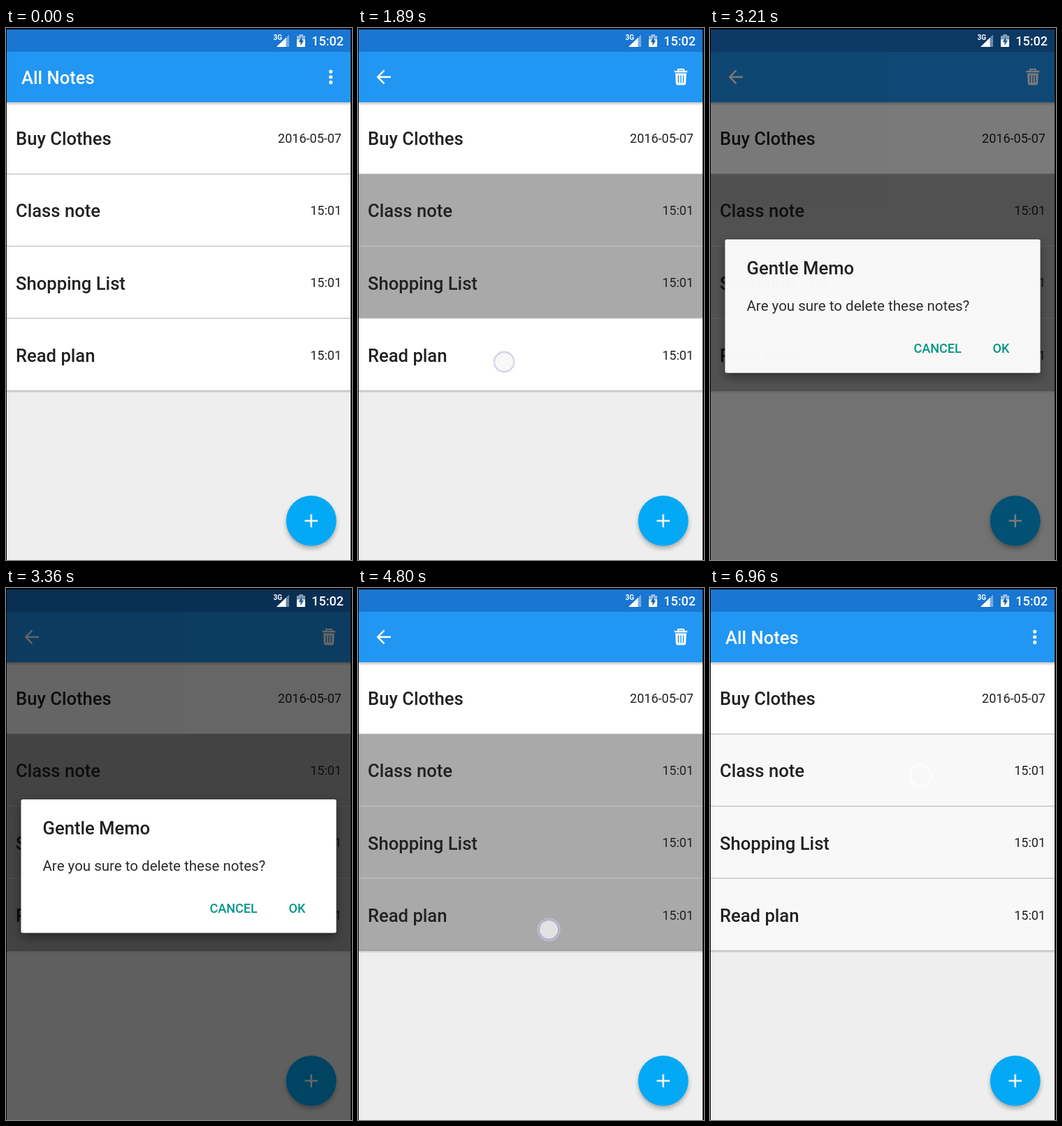
Recreate the animation shown at these times as an HTML page. Size 495 by 760 pixels, loop 7050 ms.

```html
<!DOCTYPE html>
<html lang="en">
<head>
<meta charset="utf-8">
<title>Note list</title>
<style>
html, body { margin: 0; width: 100%; height: 100%; overflow: hidden; background: #000; }
svg { display: block; width: 495px; height: 760px; font-family: Roboto, sans-serif; }
.name { font-weight: 500; font-size: 25.6px; fill: #212121; }
.small { font-size: 18px; fill: #212121; }
.end { text-anchor: end; }
.white { fill: #fff; }
.button { font-weight: 500; font-size: 18px; fill: #009688; }
.divider { stroke: #bfbfbf; stroke-width: 1.2; }

/* 1% of the loop is 70.5 ms */
.anim, .row { animation: 7050ms linear infinite; }
.row { fill: #fff; }
#row2 { animation-name: row2; }
#row3 { animation-name: row3; }
#row4 { animation-name: row4; }
@keyframes row2 {
  0%, 12.77% { fill: #fff; }
  17.87%, 82.55% { fill: #a9a9a9; }
  86.5%, 100% { fill: #f8f8f8; }
}
@keyframes row3 {
  0%, 22.13% { fill: #fff; }
  25.5%, 75.74% { fill: #a9a9a9; }
  79.5%, 100% { fill: #f8f8f8; }
}
@keyframes row4 {
  0%, 29.36% { fill: #fff; }
  32.77%, 69.79% { fill: #a9a9a9; }
  73%, 100% { fill: #f8f8f8; }
}

#press { animation-name: press; transform: scale(0); }
@keyframes press {
  0%, 8.93% { transform: scale(0); opacity: .12; }
  14% { transform: scale(1); opacity: .12; }
  17.87%, 100% { transform: scale(1); opacity: 0; }
}
#tap { animation-name: tap; opacity: 0; }
@keyframes tap {
  0%, 38.71% { transform: scale(.3); opacity: 0; }
  38.72% { transform: scale(.3); opacity: .06; }
  41% { transform: scale(1); opacity: .06; }
  46%, 100% { transform: scale(1); opacity: 0; }
}

#listBar { animation-name: listBar; animation-timing-function: step-end; }
#pickBar { animation-name: pickBar; animation-timing-function: step-end; }
@keyframes listBar {
  0%, 82.55% { opacity: 1; }
  12.77% { opacity: 0; }
}
@keyframes pickBar {
  0%, 82.55% { opacity: 0; }
  12.77% { opacity: 1; }
}

#veil { animation-name: veil; }
@keyframes veil {
  0%, 42.6% { opacity: 0; animation-timing-function: ease-out; }
  46.8%, 60.85% { opacity: .6; }
  63.4%, 100% { opacity: 0; }
}
#dialog { animation-name: dialog; filter: drop-shadow(0 6px 7px rgba(0, 0, 0, .4)); }
@keyframes dialog {
  0%, 42.9% { opacity: 0; animation-timing-function: ease-out; }
  46%, 60.28% { opacity: 1; }
  62.41%, 100% { opacity: 0; }
}

#place { animation-name: place; animation-timing-function: step-end; }
@keyframes place {
  0% { transform: translate(187px, 262px); }
  20.42% { transform: translate(200px, 370px); }
  25% { transform: translate(209px, 477px); }
  35% { transform: translate(463px, 79px); }
  50% { transform: translate(315px, 465px); }
  65% { transform: translate(273px, 488px); }
  73.5% { transform: translate(284px, 376px); }
  80% { transform: translate(301px, 268px); }
}
#touch { animation-name: touch; }
@keyframes touch {
  0%, 4.67% { opacity: 0; }
  4.68%, 19.15% { opacity: 1; }
  20.41% { opacity: 0; }
  20.43%, 22.13% { opacity: 1; }
  24.68%, 25.8% { opacity: 0; }
  27.6%, 29.36% { opacity: 1; }
  32.77%, 38.71% { opacity: 0; }
  38.72%, 40% { opacity: 1; }
  42.3%, 58.29% { opacity: 0; }
  58.3%, 60% { opacity: 1; }
  62.6%, 68.06% { opacity: 0; }
  68.07%, 69.79% { opacity: 1; }
  72.77%, 74.03% { opacity: 0; }
  74.04%, 75.74% { opacity: 1; }
  78%, 80.84% { opacity: 0; }
  80.85%, 82.55% { opacity: 1; }
  86%, 100% { opacity: 0; }
}
#trace { animation-name: trace; animation-timing-function: step-end; }
@keyframes trace {
  0% { opacity: 0; }
  86% { opacity: 1; }
}
</style>
</head>
<body>
<svg viewBox="0 0 495 760">
  <defs>
    <clipPath id="barClip"><path d="M1 34H493V106H1z"/></clipPath>
    <clipPath id="rowClip"><path d="M1 209H493V311H1z"/></clipPath>
    <linearGradient id="shade" x2="0" y2="1">
      <stop stop-opacity=".24"/>
      <stop offset="1" stop-opacity="0"/>
    </linearGradient>
  </defs>

  <path d="M1 2H493V760H1z" fill="#eee"/>

  <!-- Notes -->
  <rect class="row" x="1" y="106" width="492" height="103"/>
  <rect class="row" id="row2" x="1" y="209" width="492" height="103"/>
  <rect class="row" id="row3" x="1" y="312" width="492" height="103"/>
  <rect class="row" id="row4" x="1" y="415" width="492" height="103"/>
  <g clip-path="url(#rowClip)">
    <g transform="translate(187 262)"><circle class="anim" id="press" r="312"/></g>
  </g>
  <path class="divider" d="M1 208.6H493M1 311.6H493M1 414.6H493"/>
  <rect x="1" y="517.5" width="492" height="4" fill="url(#shade)"/>
  <g class="name">
    <text x="14" y="167">Buy Clothes</text>
    <text x="14" y="270">Class note</text>
    <text x="14" y="373.5">Shopping List</text>
    <text x="14" y="476.5">Read plan</text>
  </g>
  <g class="small end">
    <text x="480" y="164">2016-05-07</text>
    <text x="480" y="267">15:01</text>
    <text x="480" y="370">15:01</text>
    <text x="480" y="473.5">15:01</text>
  </g>

  <!-- Bars -->
  <path d="M1 2H493V34H1z" fill="#1976d2"/>
  <path d="M1 34H493V106H1z" fill="#2196f3"/>
  <rect x="1" y="106" width="492" height="5" fill="url(#shade)"/>
  <g class="anim" id="listBar">
    <text class="name white" x="22" y="80">All Notes</text>
    <g class="white">
      <circle cx="464.7" cy="62.3" r="2.6"/>
      <circle cx="464.7" cy="70" r="2.6"/>
      <circle cx="464.7" cy="77.7" r="2.6"/>
    </g>
  </g>
  <g clip-path="url(#barClip)">
    <g transform="translate(462 70)"><circle class="anim white" id="tap" r="43"/></g>
  </g>
  <g class="anim" id="pickBar" fill="none" stroke="#fff" stroke-width="2.5">
    <path d="M47 70H29M37.5 60.5L28.3 70L37.5 79.5"/>
    <path d="M458 61V59H466V61" stroke-width="2"/>
    <path d="M452.5 62.2H471.2"/>
    <path d="M454 64.8H469.8L469 79Q468.8 81.5 466.5 81.5H457.3Q455 81.5 454.8 79z" fill="#fff" stroke="none"/>
    <path d="M458.3 67.5V78.3M461.9 67.5V78.3M465.5 67.5V78.3" stroke="#2196f3" stroke-width="1.4"/>
  </g>

  <!-- Add button -->
  <circle cx="436.7" cy="704" r="36" fill="#03a9f4" style="filter: drop-shadow(0 4px 3px rgba(0, 0, 0, .28))"/>
  <path d="M427.5 704H446M436.7 694.8V713.2" stroke="#fff" stroke-width="2.6"/>

  <path class="anim" id="veil" d="M1 2H493V760H1z"/>

  <!-- Status icons -->
  <g class="white">
    <text x="382.5" y="17" font-size="10" font-weight="700">3G</text>
    <path d="M405 9.5V27H387z" opacity=".4"/>
    <path d="M400.5 14V27H387z"/>
    <path d="M419.5 9H425V11H428V17H416V11H419.5z" opacity=".5"/>
    <path d="M416 16.5H428V27H416z"/>
    <path d="M423.4 12.5L418.6 19.8H421.4V25L426 17.8H423.4z" fill="#17599e"/>
    <text x="483" y="25" class="end" font-size="18" font-weight="500">15:02</text>
  </g>

  <!-- Confirmation -->
  <g class="anim" id="dialog">
    <rect x="21.5" y="302" width="451" height="190.7" rx="2.5" fill="#fff"/>
    <text class="name" x="52.5" y="352">Gentle Memo</text>
    <text x="52.5" y="404.3" font-size="20.5" fill="#2c2c2c">Are you sure to delete these notes?</text>
    <text class="button" x="291.5" y="464">CANCEL</text>
    <text class="button" x="404.5" y="464">OK</text>
  </g>

  <!-- Finger -->
  <circle class="anim" id="trace" cx="301" cy="268" r="15" fill="none" stroke="#fcfdff" stroke-width="3"/>
  <g class="anim" id="place">
    <g class="anim" id="touch">
      <circle r="15.5" fill="none" stroke="#dcdcec" stroke-opacity=".5" stroke-width="2"/>
      <circle r="14" fill="#f0f0f0" fill-opacity=".8" stroke="#acaad2" stroke-width="1.8"/>
    </g>
  </g>

  <path d="M0 0H495V760H493V1.5H1V760H0z"/>
</svg>
</body>
</html>
```
